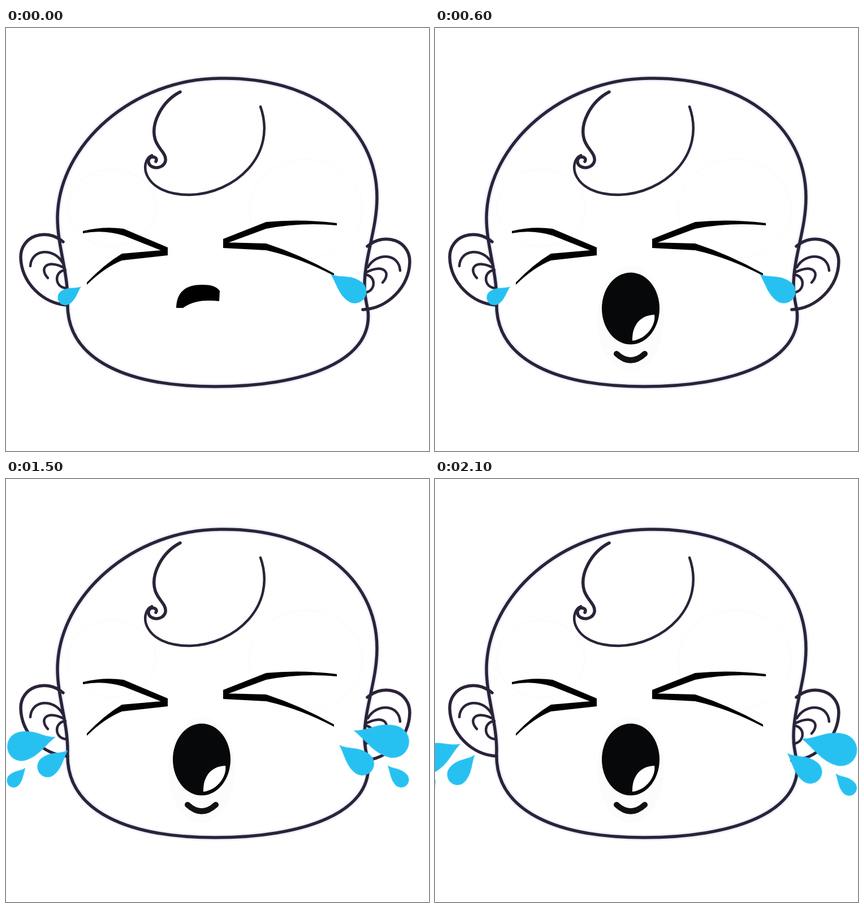
These frames come from a looping animation (748 px wide and 748 px high, 2400 ms). An HTML page:

```html
<!DOCTYPE html>
<html lang="en">
<head>
<meta charset="utf-8">
<title>Crying baby</title>
<style>
  html, body { margin: 0; height: 100%; overflow: hidden; background: #fff; }
  svg { display: block; width: 100%; height: 100%; }
  #lines { fill: none; stroke: #2c2339; stroke-width: 5.5; stroke-linecap: round; filter: blur(.6px); }
  #tears { fill: #27c1f1; }
</style>
</head>
<body>
<svg viewBox="0 0 748 748">
  <defs>
    <path id="drop" d="M0 0C22-4 35-26 66-26A26 26 0 0 1 66 26C40 26 24 10 0 0Z"/>
    <g id="spray">
      <use href="#drop" transform="rotate(5) scale(1.1)"/>
      <use href="#drop" transform="translate(-20 30) rotate(28) scale(.8)"/>
      <use href="#drop" transform="translate(71 49) rotate(36) scale(.53)"/>
    </g>
    <g id="ear">
      <path d="M101 378C70 352 26 368 26 405C27 450 65 488 109 490"/>
      <path stroke-width="4.5" d="M43 421C45 390 85 388 100 415M74 442C58 425 72 408 103 424M105 428C85 430 85 458 106 460"/>
    </g>
    <path id="head" d="M378 89C540 86 656 170 656 300C656 355 634 405 634 455C634 470 636 480 640 500C650 590 525 634 370 634C220 634 103 590 109 480C109 430 91 385 91 335C93 205 225 90 378 89Z"/>
  </defs>
  <g id="lines">
    <g stroke="#f8f8f8" stroke-width="1">
      <ellipse cx="187" cy="318" rx="78" ry="68"/>
      <ellipse cx="530" cy="320" rx="100" ry="88"/>
    </g>
    <use href="#head" stroke="#eaf2fd" stroke-width="11"/>
    <use href="#head"/>
    <use href="#ear"/>
    <use href="#ear" transform="translate(740 8) scale(-1 1)"/>
    <path d="M308 113C275 130 255 170 264 198C270 215 284 222 282 235C278 252 250 250 252 234C255 224 270 228 265 236"/>
    <path stroke-width="4.5" d="M258 225C235 235 240 295 325 295C405 293 480 225 450 139"/>
  </g>
  <path id="eyes"/>
  <path id="frown" d="M301 495C302 466 318 454 347 454C362 454 373 457 378 465L377 483C355 481 332 481 313 495Z"/>
  <g id="open">
    <ellipse cy="18" rx="59" ry="94" fill="#fcfcfc"/>
    <ellipse rx="51" ry="63.5" fill="#060809"/>
    <path d="M3 57C2 36 12 12 42 11C45 28 29 54 3 57Z" fill="#fff"/>
    <path d="M-25 80Q0 103 25 80" fill="none" stroke="#111" stroke-width="10" stroke-linecap="round"/>
  </g>
  <g id="tears">
    <use id="left"/>
    <use id="right"/>
  </g>
</svg>
<script>
const $ = id => document.getElementById(id);
const set = (id, name, value) => $(id).setAttribute(name, value);

// Eyelid stroke: thin outer end, thick from the bend to the inner end
function lid(outerX, outerY, bendX, bendY, innerX, innerY) {
  const midX = (outerX + bendX) / 2, midY = (outerY + bendY) / 2 - 8;
  return `M${outerX} ${outerY - 2}Q${midX} ${midY - 3} ${bendX} ${bendY - 6}L${innerX} ${innerY - 5}v10`
    + `L${bendX} ${bendY + 6}Q${midX} ${midY + 3} ${outerX} ${outerY + 2}Z`;
}
set('eyes', 'd', lid(136, 361, 208, 361, 286, 393) + lid(143, 452, 205, 405, 286, 397)
  + lid(585, 347, 460, 349, 384, 378) + lid(580, 436, 460, 387, 384, 384));

// The mouth shrinks towards its upper left; size 0 is the frown
function setMouth(size) {
  set('frown', 'visibility', size ? 'hidden' : 'visible');
  set('open', 'visibility', size ? 'visible' : 'hidden');
  set('open', 'transform', `translate(${285 + 61 * size} ${414 + 82 * size}) scale(${size})`);
}

function setTear(side, shape, x, y, scale, angle) {
  set(side, 'href', shape);
  set(side, 'transform', `translate(${x} ${y}) scale(${scale}) rotate(${angle})`);
}

// Single drops swell and fall
function well(n) {
  const left = .52 + .42 * n;
  setTear('left', '#drop', 133 - 11 * n, 457 + 4 * n, [-left, left], 35);
  setTear('right', '#drop', 574 + 21 * n, 435 + 15 * n, .8 + .17 * n, 36 + 3 * n);
}

// Clusters fly outwards
function fly(n) {
  setTear('left', '#spray', 131 - 43 * n, 444 + 12 * n, [-.87, .9], 10 * n);
  setTear('right', '#spray', 581 + 33.5 * n, 430 + 14.5 * n, 1, 11 * Math.min(n, 1));
}

const mouthSizes = [0, .7, 1, .855, 1, 1, .855, 1];

function draw() {
  const step = Math.floor(performance.now() % 2400 / 300);
  setMouth(mouthSizes[step]);
  if (step < 4) well(step % 2);
  else fly(step - 3 >> 1);
  requestAnimationFrame(draw);
}
draw();
</script>
</body>
</html>
```
